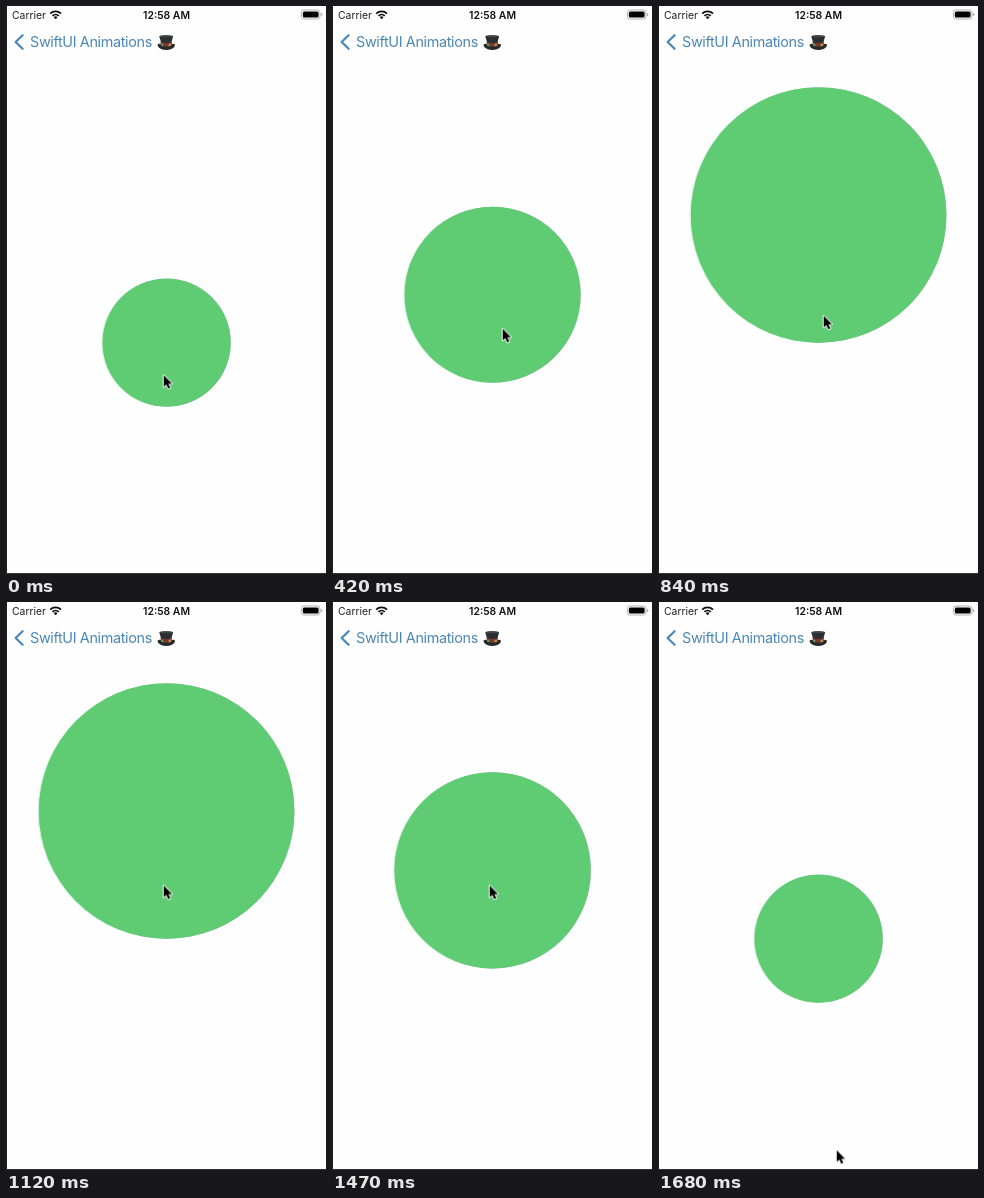
Write an HTML page that moves like this. It is 320 px wide and 568 px high and loops after 1.75 s.

```html
<!DOCTYPE html>
<html lang="en">
<head>
<meta charset="utf-8">
<title>SwiftUI Animations</title>
<style>
  html, body { margin: 0; width: 100%; height: 100%; overflow: hidden; background: #fff; }
  svg { display: block; width: 320px; height: 568px; }
  text { font-family: Inter, Roboto, sans-serif; }
  .status { font-size: 10.4px; fill: #222; }
  .time { font-weight: 600; fill: #111; text-anchor: middle; }
  .title { font-size: 14.4px; letter-spacing: -.35px; fill: #4a87b5; }
</style>
</head>
<body>
<svg viewBox="0 0 320 568">
  <rect width="320" height="568" fill="#fefefe"/>

  <text class="status" x="6" y="12.6">Carrier</text>
  <g fill="none" stroke="#111" stroke-width="1.8">
    <path d="M44.2 7.6a7.7 7.7 0 0 1 10.8 0"/>
    <path d="M46.4 9.9a4.6 4.6 0 0 1 6.4 0"/>
  </g>
  <path d="M49.6 13.2l-1.9-2a2.7 2.7 0 0 1 3.8 0z" fill="#111"/>
  <text class="status time" x="160.5" y="12.6">12:58 AM</text>
  <rect x="295.4" y="4" width="18.6" height="9" rx="2.6" fill="#fff" stroke="#aaa" stroke-width=".9"/>
  <rect x="296.8" y="5.4" width="15.8" height="6.2" rx="1.5" fill="#000"/>
  <path d="M315.2 7v3.2q1.2-.5 1.2-1.6t-1.2-1.6z" fill="#999"/>

  <path d="M16.6 29.2L9.6 36l7 6.8" fill="none" stroke="#4a87b5" stroke-width="2.2" stroke-linecap="round" stroke-linejoin="round"/>
  <text class="title" x="24" y="41.2">SwiftUI Animations</text>
  <g>
    <path d="M151.6 38.6q1.6-1.6 3.6-.4h10q2.2-1.2 3.7.4q.4 2.6-3.4 4.5q-5.2 2-10.4 0q-3.8-1.9-3.5-4.5z" fill="#24292a"/>
    <path d="M153.2 30.2q7-2 14 0q-1.9 4.5-1.8 9.6q-5.2 1.8-10.4 0q.2-5-1.8-9.6z" fill="#2b2f31"/>
    <path d="M154.7 36.2q5.5 1.6 11 0l-.2 3.5q-5.3 1.8-10.6 0z" fill="#78392f"/>
    <path d="M155 37.4l2.2.5v2.4l-2.2-.5z" fill="#55a35a"/>
    <path d="M162.6 37.9l2.6-.6v2.5l-2.6.6z" fill="#cf8a3c"/>
    <ellipse cx="160.2" cy="30.2" rx="6.6" ry="1" fill="#414648"/>
  </g>

  <circle class="ball" transform="translate(-1.3 .2)" fill="#d9f5e2"/>
  <circle class="ball" transform="translate(.4 -.1)" fill="#96bfa4"/>
  <circle class="ball" fill="#5fcc73"/>

  <path id="cursor" d="M0 0v11.6l2.6-2.4 1.9 4.3 2-.9-1.9-4.1h3.7z" fill="#000" stroke="#fff" stroke-width="1.7" stroke-linejoin="round" paint-order="stroke"/>

  <rect width="1" height="568" fill="#222"/>
  <rect y="567" width="320" height="1" fill="#333"/>
</svg>
<script>
const LOOP = 1750, STEP = 70, COUNT = LOOP / STEP;
const clamp = v => Math.min(1, Math.max(0, v));
const mix = (a, b, p) => a + (b - a) * p;

// cubic-bezier(.42, 0, .58, 1), solved by bisection
function easeInOut(x) {
  if (x <= 0 || x >= 1) return clamp(x);
  let lo = 0, hi = 1;
  for (let i = 0; i < 24; i++) {
    const s = (lo + hi) / 2, q = 1 - s;
    if (1.26 * s * q * q + 1.74 * s * s * q + s ** 3 < x) lo = s; else hi = s;
  }
  return lo * lo * (3 - 2 * lo);
}

function ball(t) {
  const p = easeInOut((t - 262) / 370) - easeInOut((t - 1306) / 342);
  return {
    cx: '160.5px',
    cy: mix(336.7, 209.1, p) + 'px',
    r: mix(64, 127.7, p) + 'px'
  };
}

// time, x, y
const path = [
  [0, 157.7, 369.2],
  [210, 170.7, 322.8],
  [700, 170.7, 322.8],
  [840, 165.7, 309.8],
  [1120, 157.7, 283.6],
  [1490, 157.7, 283.6],
  [1680, 178.7, 548.3]
];

function cursor(t) {
  let i = 0;
  while (i < path.length - 2 && t >= path[i + 1][0]) i++;
  const [t0, x0, y0] = path[i], [t1, x1, y1] = path[i + 1];
  const p = clamp((t - t0) / (t1 - t0));
  return { transform: `translate(${mix(x0, x1, p)}px, ${mix(y0, y1, p)}px)` };
}

function play(el, pose) {
  const frames = Array.from({ length: COUNT + 1 }, (_, i) => ({
    ...pose(Math.min(i, COUNT - 1) * STEP),
    offset: i / COUNT,
    easing: 'step-end'
  }));
  el.animate(frames, { duration: LOOP, iterations: Infinity });
}

document.querySelectorAll('.ball').forEach(el => play(el, ball));
play(document.getElementById('cursor'), cursor);
</script>
</body>
</html>
```
